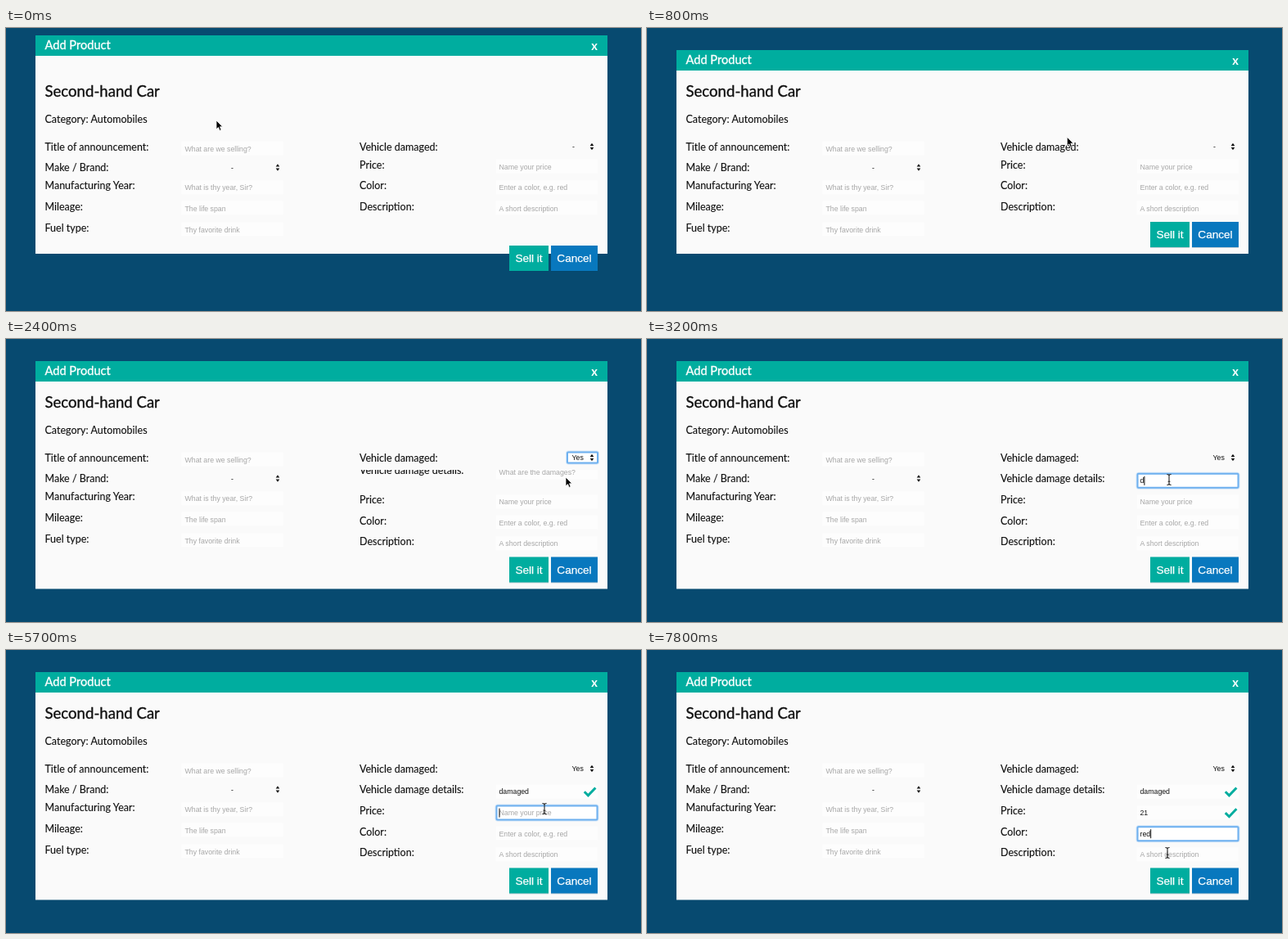
Animation, 776 px wide and 346 px high, one loop 8 s. Source, as an HTML page:

```html
<!DOCTYPE html>
<html lang="en">
<head>
<meta charset="utf-8">
<title>Add Product</title>
<style>
  html, body { margin: 0; width: 100%; height: 100%; overflow: hidden; background: #074a70; }
  svg { display: block; }
  text { white-space: pre; }
  .label { font: 12.5px Lato, sans-serif; fill: #111; stroke: #111; stroke-width: .12px; }
  .title { font-size: 18.6px; stroke-width: .35px; }
  .head { font: 14.6px Lato, sans-serif; fill: #fff; stroke: #fff; stroke-width: .35px; }
  .close { font-weight: 700; text-anchor: middle; stroke: none; }
  .input { font: 8.75px "Liberation Sans", Arial, sans-serif; fill: #111; }
  .hint { fill: #a6a6a6; }
  .box { fill: #fdfdfd; }
  .ring { fill: #fff; stroke: #6eb0ef; stroke-width: 2; }
  .glow { fill: none; stroke: #8cc2f5; stroke-opacity: .4; stroke-width: 4; }
  .tick { fill: none; stroke: #00ad9f; stroke-width: 3; }
  .button { font: 13.6px "Liberation Sans", Arial, sans-serif; fill: #fff; stroke: #fff; stroke-width: .25px; text-anchor: middle; }
</style>
</head>
<body>
<svg id="stage" width="776" height="346" viewBox="0 0 776 346"></svg>
<script>
const LOOP = 8000, STEP = 100, GROW = 29.5;
const stage = document.getElementById('stage');
const $ = id => document.getElementById(id);

// Markup helpers
const text = (cls, x, y, str) => `<text class="${cls}" x="${x}" y="${y}">${str}</text>`;
const label = (x, y, str) => text('label', x, y, str);
const ring = (x, y, w, h) =>
  `<rect class="glow" x="${x}" y="${y}" width="${w}" height="${h}" rx="1.5"/>` +
  `<rect class="ring" x="${x}" y="${y}" width="${w}" height="${h}" rx="1"/>`;
const arrows = (x, y) =>
  `<path d="M${x - 2.3} ${y - 1}h4.6l-2.3 -3.2zM${x - 2.3} ${y + 1}h4.6l-2.3 3.2z" fill="#111"/>`;
const plainField = (x, y, hint) =>
  `<rect class="box" x="${x - 4}" y="${y - 12}" width="124" height="17"/>` + text('input hint', x, y, hint);
const liveField = (id, y, hint) => `
  <rect class="box" x="599" y="${y - 12}" width="124" height="17"/>
  <g id="${id}-ring">${ring(599.5, y - 11.5, 123, 17)}</g>
  <text id="${id}-hint" class="input hint" x="602.5" y="${y}">${hint}</text>
  <text id="${id}-text" class="input" x="602.5" y="${y}"></text>
  <rect id="${id}-caret" y="${y - 8.5}" width="1" height="11" fill="#111"/>
  <path id="${id}-tick" class="tick" d="M706.8 ${y - 3}l4.6 4.6l9 -9.4"/>`;
const button = (id, x, w, fill, str) => `
  <g id="${id}">
    <rect x="${x}" y="237.3" width="${w}" height="31.6" fill="#053c5c" opacity=".25"/>
    <rect x="${x}" y="237" width="${w}" height="31" fill="${fill}"/>
    ${text('button', x + w / 2, 257.3, str)}
  </g>`;

stage.innerHTML = `
  <clipPath id="row-clip"><rect x="425" y="160" width="311" height="30"/></clipPath>
  <rect id="panel" x="36" y="27" width="699" height="249" fill="#fafafa"/>
  <g id="header">
    <rect x="36" y="27" width="699" height="25" fill="#00ad9f"/>
    ${text('head', 47.5, 44.4, 'Add Product')}
    ${text('head close', 719, 45, 'x')}
  </g>
  ${text('label title', 47.5, 84.3, 'Second-hand Car')}
  ${label(47.5, 115.8, 'Category: Automobiles')}
  ${label(47.5, 149.8, 'Title of announcement:')}
  ${label(47.5, 175.3, 'Make / Brand:')}
  ${label(47.5, 197.3, 'Manufacturing Year:')}
  ${label(47.5, 222.8, 'Mileage:')}
  ${label(47.5, 248.8, 'Fuel type:')}
  ${plainField(218.5, 150.6, 'What are we selling?')}
  ${text('input', 275, 174, '-')}${arrows(332, 170.5)}
  ${plainField(218.5, 198.2, 'What is thy year, Sir?')}
  ${plainField(218.5, 223.7, 'The life span')}
  ${plainField(218.5, 249.5, 'Thy favorite drink')}

  ${label(432, 149.8, 'Vehicle damaged:')}
  <g id="select-ring">${ring(686, 138.5, 37, 13)}</g>
  <text id="choice" class="input" y="148"></text>
  ${arrows(716, 145)}
  <g clip-path="url(#row-clip)"><g id="row">
    ${label(432, 175.4, 'Vehicle damage details:')}
    ${liveField('details', 176.3, 'What are the damages?')}
  </g></g>
  <g id="lower">
    ${label(432, 171.8, 'Price:')}
    ${label(432, 197.3, 'Color:')}
    ${label(432, 222.8, 'Description:')}
    ${liveField('price', 172.6, 'Name your price')}
    ${liveField('color', 198.2, 'Enter a color, e.g. red')}
    ${plainField(602.5, 223.7, 'A short description')}
  </g>
  ${button('sell', 615, 48, '#00ad9f', 'Sell it')}
  ${button('cancel', 666, 57, '#0878be', 'Cancel')}

  <g id="menu">
    <rect x="677" y="135" width="49" height="46" rx="4" opacity=".18"/>
    <rect x="677.5" y="134" width="48" height="44.5" rx="3.5" fill="#fff" stroke="#ccc" stroke-width=".6"/>
    <rect id="mark" x="678" width="47" height="12.4" fill="#0c66d6"/>
    <path id="check" d="M682.5 144l2.2 3l4.4 -6.6" fill="none" stroke-width="1.4"/>
    <text id="opt0" class="input" x="694" y="147">-</text>
    <text id="opt1" class="input" x="694" y="159.4">Yes</text>
    <text id="opt2" class="input" x="694" y="172">No</text>
  </g>
  <path id="arrow" d="M0 0V10.8L2.5 8.5L4.2 12.4L6.1 11.6L4.5 7.8H7.8Z" fill="#000" stroke="#fff" stroke-width=".8"/>
  <path id="beam" d="M-2.6 -6.5Q0 -6.5 0 -4.8Q0 -6.5 2.6 -6.5M0 -5V5M-2.6 6.5Q0 6.5 0 4.8Q0 6.5 2.6 6.5M-1.4 2.2H1.4"
    fill="none" stroke="#222" stroke-width="1.1"/>`;

// Steps: [time, value, ...]
const headerY = [[0, -18], [100, 16], [250, -6.5], [400, 3.3], [500, 0]];
const buttonPose = [[0, 29, 1], [200, 14, 1.1], [400, 5, 1.2], [600, 1, 1.07], [800, 0, 1]];
const pointer = [
  [0, 257, 113], [400, 308, 117], [700, 450, 129], [1000, 640, 142], [1200, 712, 145],
  [1400, 713, 147], [1600, 712, 156], [1900, 712, 156], [2200, 684, 169], [2400, 684, 169],
  [2700, 638, 172], [5100, 638, 172], [5500, 658, 194], [6400, 658, 194], [6600, 664, 220],
  [7500, 664, 220], [7800, 636, 248]
];
const hiddenSpans = [[4100, 5100], [5900, 6400], [7100, 7500]];
const fields = [
  { id: 'details', from: 2900, to: 5400, word: 'damaged', keys: [3200, 3600, 4200, 4400, 4600, 4700, 4800] },
  { id: 'price', from: 5400, to: 6900, word: '21', keys: [5900, 6100] },
  { id: 'color', from: 6900, to: LOOP, word: 'red', keys: [7100, 7200, 7400] }
];

const within = (t, a, b) => t >= a && t < b;
const show = (id, on) => $(id).setAttribute('display', on ? 'inline' : 'none');
const move = (id, x, y) => $(id).setAttribute('transform', `translate(${x} ${y})`);

function at(steps, t) {
  const i = steps.findIndex(s => s[0] > t);
  if (i < 0) return steps[steps.length - 1].slice(1);
  const a = steps[i - 1], b = steps[i], k = (t - a[0]) / (b[0] - a[0]);
  return a.slice(1).map((v, n) => v + (b[n + 1] - v) * k);
}

function drawField(f, t) {
  const typed = f.word.slice(0, f.keys.filter(k => k <= t).length);
  const focused = within(t, f.from, f.to);
  const el = $(f.id + '-text');
  el.textContent = typed;
  show(f.id + '-hint', !typed);
  show(f.id + '-ring', focused);
  show(f.id + '-caret', focused);
  show(f.id + '-tick', t >= f.to);
  $(f.id + '-caret').setAttribute('x', 602.5 + (typed ? el.getComputedTextLength() : 0));
}

function drawMenu(t, y) {
  const open = within(t, 1300, 1900), active = y < 150 ? 0 : 1;
  show('menu', open);
  $('mark').setAttribute('y', active ? 150 : 137.8);
  [0, 1, 2].forEach(i => $('opt' + i).style.fill = i === active ? '#fff' : '#111');
  $('check').setAttribute('stroke', active ? '#111' : '#fff');
  const chosen = t >= 1900;
  $('choice').textContent = chosen ? 'Yes' : '-';
  $('choice').setAttribute('x', chosen ? 691.5 : 692);
  show('select-ring', within(t, 1900, 2900));
}

function draw(t) {
  const grown = t >= 2400, shift = grown ? GROW : 0;
  $('panel').setAttribute('height', 249 + shift);
  move('header', 0, at(headerY, t)[0]);
  move('lower', 0, shift);

  const slide = Math.min(1, Math.max(0, (t - 2400) / 500));
  show('row', grown);
  move('row', 0, -10 * (1 - slide) ** 2);

  const [dy, s] = at(buttonPose, t);
  [['sell', 639], ['cancel', 694.5]].forEach(([id, cx]) =>
    $(id).setAttribute('transform', `translate(${cx} ${252.5 + dy + shift}) scale(${s}) translate(${-cx} -252.5)`));

  const [x, y] = at(pointer, t);
  const visible = !hiddenSpans.some(([a, b]) => within(t, a, b));
  show('arrow', visible && t < 2600);
  show('beam', visible && t >= 2600);
  move('arrow', x, y);
  move('beam', x, y);

  drawMenu(t, y);
  fields.forEach(f => drawField(f, t));
}

const start = performance.now();
function tick() {
  const t = (performance.now() - start) % LOOP;
  draw(Math.floor(t / STEP) * STEP);
  requestAnimationFrame(tick);
}
tick();
</script>
</body>
</html>
```
